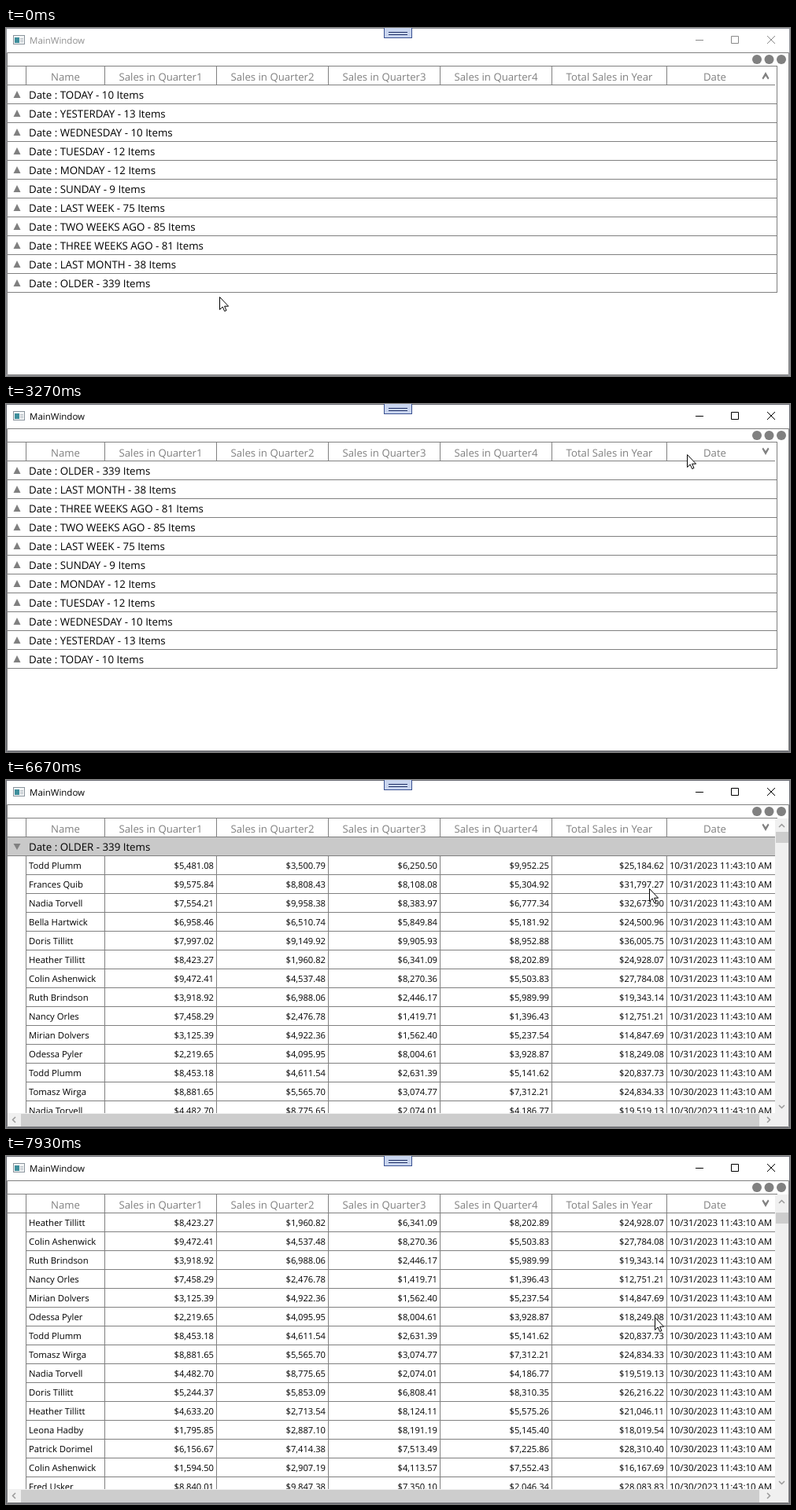
Recreate the animation shown at these times as an HTML page. Size 996 px wide and 443 px high, loop 8000 ms.

```html
<!DOCTYPE html>
<html lang="en">
<head>
<meta charset="utf-8">
<title>Sales grid</title>
<style>
  html, body { margin: 0; width: 100%; height: 100%; overflow: hidden; background: #fff; }
  svg { display: block; }
  text { font: 13.3px "Open Sans", "Noto Sans", sans-serif; text-rendering: geometricPrecision; white-space: pre; }
  .line { fill: none; stroke: #808080; }
  .head { fill: #808080; text-anchor: middle; font-size: 13.2px; }
  .cell { font-size: 11.3px; }
  .num { font-size: 11.2px; text-anchor: end; }
  .date { font-size: 11.5px; }
  .gray { fill: #808080; }
  .track { fill: #f0f0f0; }
  .thumb { fill: #cdcdcd; }
  .arrow { fill: none; stroke: #9a9a9a; stroke-width: 1.5; }
</style>
</head>
<body>
<svg width="996" height="443" viewBox="0 0 996 443">
  <defs><clipPath id="body"><rect x="2" y="72" width="975" height="352"/></clipPath></defs>
  <rect width="996" height="443" fill="#fff"/>

  <!-- window frame and title bar -->
  <rect id="frame" x=".5" y=".5" width="995" height="442" fill="none"/>
  <rect x="9.5" y="9.5" width="14" height="11" fill="#f4f6f7" stroke="#8a949c"/>
  <rect x="11" y="12" width="6" height="7" fill="#3f8f9c"/>
  <path d="M18 13.5h4M18 15.5h4M18 17.5h4" stroke="#b4bcc2"/>
  <text id="title" x="30" y="20" style="font-size:11.5px">MainWindow</text>
  <path id="buttons" d="M876 15.5h10M921.5 10.5h9v9h-9zM967 10l10 10M977 10l-10 10" fill="none"/>
  <rect x="480.5" y="-.5" width="35" height="13" fill="#c9d5ee" stroke="#3a5192"/>
  <path d="M486 5.5h24M486 8.5h24" stroke="#1f2f66"/>

  <!-- grid frame and header -->
  <path class="line" d="M1.5 31.5h993v410h-993z"/>
  <g class="gray"><circle cx="954" cy="40" r="6"/><circle cx="969.5" cy="40" r="6"/><circle cx="985" cy="40" r="6"/></g>
  <g id="list"></g>
  <g id="listDown"></g>
  <g id="table">
    <g clip-path="url(#body)"><g id="rows"></g></g>
    <path class="track" d="M977 49h17v392H2v-17h975z"/>
    <rect id="thumb" class="thumb" x="978" y="66" width="16" height="14"/>
    <rect class="thumb" x="19" y="425" width="938" height="16"/>
    <path class="arrow" d="M982 60l3.5-3.5 3.5 3.5M982 414l3.5 3.5 3.5-3.5M12 429l-3.5 3.5 3.5 3.5M967 429l3.5 3.5-3.5 3.5"/>
  </g>
  <g id="header"></g>
  <path id="sort" class="gray" d="M960.5 64L965 56l4.5 8-1.5 1.500-3-4.500-3 4.500z"/>
  <path id="cursor" d="M.5.5v16l3.700-3.500 2.500 5.500 2.300-1-2.400-5.300h5z" fill="#fff" stroke="#000"/>
</svg>
<script>
const $ = id => document.getElementById(id);
const edges = [25, 125, 267, 409, 551, 693, 839];
const heads = ['Name', 'Sales in Quarter1', 'Sales in Quarter2', 'Sales in Quarter3', 'Sales in Quarter4', 'Total Sales in Year', 'Date'];
const groups = ['TODAY - 10', 'YESTERDAY - 13', 'WEDNESDAY - 10', 'TUESDAY - 12', 'MONDAY - 12', 'SUNDAY - 9',
  'LAST WEEK - 75', 'TWO WEEKS AGO - 85', 'THREE WEEKS AGO - 81', 'LAST MONTH - 38', 'OLDER - 339'];

// name, then the four quarters in cents
const sales = `Todd Plumm,548108,350079,625050,995225
Frances Quib,957584,880843,810808,530492
Nadia Torvell,755421,995838,838397,677734
Bella Hartwick,695846,651074,584984,518192
Doris Tillitt,799702,914992,990593,895288
Heather Tillitt,842327,196082,634109,820289
Colin Ashenwick,947241,453748,827036,550383
Ruth Brindson,391892,698806,244617,598999
Nancy Orles,745829,247678,141971,139643
Mirian Dolvers,312539,492236,156240,523754
Odessa Pyler,221965,409595,800461,392887
Todd Plumm,845318,461154,263139,514162
Tomasz Wirga,888165,556570,307477,731221
Nadia Torvell,448270,877565,207401,418677
Doris Tillitt,524437,585309,680841,831035
Heather Tillitt,463320,271354,812411,557526
Leona Hadby,179585,288710,819119,514540
Patrick Dorimel,615667,741438,751349,722586
Colin Ashenwick,159450,290719,411357,755243
Fred Usker,884001,984738,735010,204634`.split('\n').map(row => row.split(','));

const text = (x, y, s, cls = '') => `<text x="${x}" y="${y}" class="${cls}">${s}</text>`;
const line = d => `<path class="line" d="${d}"/>`;
const money = cents => '$' + (cents / 100).toLocaleString('en-US', { minimumFractionDigits: 2 });

const groupList = names => names.map((name, i) => {
  const y = 72 + 24 * i;
  return `<path class="gray" d="M14 ${y + 8}l4.500 9h-9z"/>` +
    text(29, y + 18, `Date : ${name} Items`) + line(`M1 ${y + 24.5}H980`);
}).join('') + line('M979.5 48V337');

function salesRow([name, ...quarters], i) {
  const y = 96 + 24 * i, cents = quarters.map(Number);
  cents.push(cents.reduce((a, b) => a + b));
  return text(29, y + 17, name, 'cell') +
    cents.map((c, k) => text(edges[k + 2] - 3, y + 17, money(c), 'num')).join('') +
    text(843, y + 17, `10/${i < 11 ? 31 : 30}/2023 11:43:10 AM`, 'date') +
    line(`M25 ${y + 24.5}H977`);
}

$('list').innerHTML = groupList(groups);
$('listDown').innerHTML = groupList([...groups].reverse());
$('rows').innerHTML = '<rect x="2" y="73" width="975" height="23" fill="#c9c9c9"/>' +
  '<path class="gray" d="M9.500 81h9l-4.500 8z"/>' +
  text(29, 90, 'Date : OLDER - 339 Items') + line('M1 96.5H977') +
  sales.map(salesRow).join('') + edges.map(x => line(`M${x + .5} 97V600`)).join('');
$('header').innerHTML = line('M1 48.5H980M1 72.5H977') +
  edges.map((x, i) => line(`M${x + .5} 48V72`) +
    text((x + (edges[i + 1] || 961) + 1) / 2, 67, heads[i], 'head')).join('');

// pointer path: time, x, y
const path = [
  [0, 271, 342], [400, 112, 63], [600, 84, 150], [870, 133, 270], [1000, 180, 333], [1330, 700, 290],
  [1600, 967, 186], [1730, 929, 99], [1930, 926, 59], [3200, 926, 59], [3600, 560, 88], [3830, 230, 95],
  [4060, 20, 80], [4130, 18, 80], [4330, 18, 80], [4460, 14, 84], [6000, 14, 84], [6660, 817, 138],
  [7060, 817, 138], [7260, 817, 142], [7930, 824, 205]];

function pointer(t) {
  const i = path.findIndex(p => p[0] > t);
  if (i < 0) return path[path.length - 1].slice(1);
  const [t0, ...a] = path[i - 1], [t1, ...b] = path[i];
  return a.map((v, k) => Math.round(v + (b[k] - v) * (t - t0) / (t1 - t0)));
}

const show = (id, on) => $(id).style.display = on ? '' : 'none';

function draw(now) {
  const t = Math.floor((now % 8000 + 5) * .015) / .015;
  const active = t > 2260, down = t > 2660, open = t > 5590;
  const scroll = t > 7125 ? 1 + Math.floor((t - 7125) / 155) : 0;

  $('frame').setAttribute('stroke', active ? '#6a6c74' : '#92949a');
  $('title').setAttribute('fill', active ? '#000' : '#8f8f8f');
  $('buttons').setAttribute('stroke', active ? '#000' : '#8a8a8a');
  show('list', !down);
  show('listDown', down && !open);
  show('table', open);
  $('sort').setAttribute('transform', down ? 'matrix(1 0 0 -1 0 121)' : '');
  $('rows').setAttribute('transform', `translate(0 ${-24 * scroll})`);
  $('thumb').setAttribute('y', 66 + scroll);
  $('cursor').setAttribute('transform', `translate(${pointer(t)})`);
  requestAnimationFrame(draw);
}
requestAnimationFrame(draw);
</script>
</body>
</html>
```
